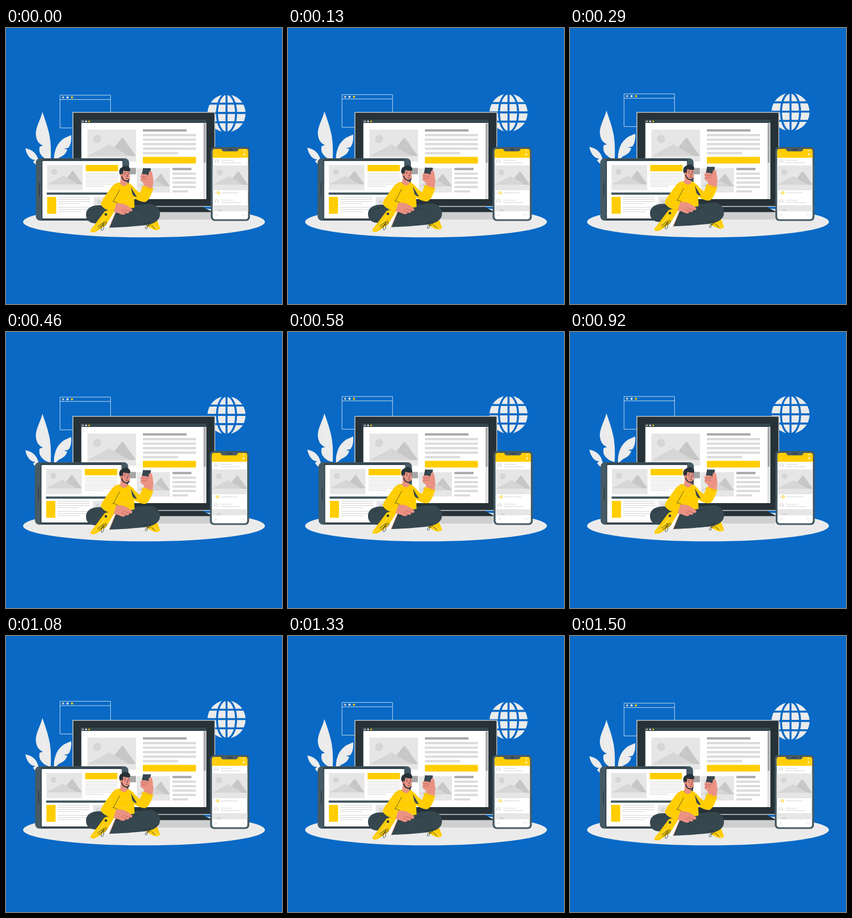
Animation, 500 px wide and 500 px high, one loop 1540 ms. Source, as an HTML page with a canvas:

```html
<!DOCTYPE html>
<html lang="en">
<head>
<meta charset="utf-8">
<title>Responsive screens</title>
<style>
html, body { margin: 0; width: 100%; height: 100%; overflow: hidden; background: #0969c5; }
canvas { display: block; width: 100vw; height: 100vh; }
</style>
</head>
<body>
<canvas id="stage"></canvas>
<script>
const canvas = document.getElementById('stage');
const ctx = canvas.getContext('2d');
const ratio = Math.max(1, window.devicePixelRatio || 1);
canvas.width = canvas.height = 500 * ratio;

const LOOP = 1540, STEPS = 37, PERIOD = 1500, LIFT = 6.2, SWAY = 0.46;
const BLUE = '#0969c5', PALE = '#ebebeb', YELLOW = '#ffcd00', INK = '#263238',
      SLATE = '#37474f', STEEL = '#455a64', SKIN = '#eb9283', LINE = '#dbdbdb', GREY = '#a6a6a6';

function box(x1, y1, x2, y2, fill, radius = 0) {
  ctx.fillStyle = fill;
  ctx.beginPath();
  ctx.roundRect(x1, y1, x2 - x1, y2 - y1, radius);
  ctx.fill();
}

function oval(x, y, rx, ry, fill) {
  ctx.fillStyle = fill;
  ctx.beginPath();
  ctx.ellipse(x, y, rx, ry, 0, 0, 2 * Math.PI);
  ctx.fill();
}

const dot = (x, y, r, fill) => oval(x, y, r, r, fill);

function shape(d, fill) {
  ctx.fillStyle = fill;
  ctx.fill(new Path2D(d));
}

function stroke(d, color, width = 0.8) {
  ctx.strokeStyle = color;
  ctx.lineWidth = width;
  ctx.lineCap = ctx.lineJoin = 'round';
  ctx.stroke(new Path2D(d));
}

function shifted(dx, dy, draw) {
  ctx.save();
  ctx.translate(dx, dy);
  draw();
  ctx.restore();
}

function clipped(path, draw) {
  ctx.save();
  ctx.clip(path);
  draw();
  ctx.restore();
}

function speckled(d, fill, speck, seed, [x, y, w, h], count, size = 0.45) {
  const path = new Path2D(d);
  ctx.fillStyle = fill;
  ctx.fill(path);
  const random = () => (seed = (seed * 16807) % 2147483647) / 2147483647;
  clipped(path, () => {
    for (let i = 0; i < count; i++) dot(x + random() * w, y + random() * h, size, speck);
  });
}

// Picture placeholder; all inner sizes follow its width.
function picture(x, y, w, h) {
  const frame = new Path2D();
  frame.rect(x, y, w, h);
  ctx.fillStyle = '#e6e6e6';
  ctx.fill(frame);
  clipped(frame, () => {
    ctx.translate(x, y);
    ctx.scale(w / 88, w / 88);
    dot(17.5, 17, 7.5, '#d6d6d6');
    shape('M36 48 L61 17 Q63.5 13 66 17 L88 48 Z', '#c7c7c7');
    shape('M0 48 L36 29 Q40 25 44 29 L76 48 Z', '#d6d6d6');
  });
}

function rows(x1, x2, y, step, count, height, lastX = x2, fill = LINE) {
  for (let i = 0; i < count; i++)
    box(x1, y + i * step, i === count - 1 ? lastX : x2, y + i * step + height, fill);
}

function threeDots(x, y, gap, r) {
  ['#c7c7c7', '#fff', YELLOW].forEach((c, i) => dot(x + i * gap, y, r, c));
}

function browserOutline() {
  ctx.strokeStyle = '#dce8f2';
  ctx.lineWidth = 0.9;
  ctx.strokeRect(98.3, 121.7, 91, 59.3);
  stroke('M98.3 129.6 H189.3', '#dce8f2', 0.9);
  threeDots(103.5, 125.7, 8, 1.9);
}

function globe() {
  dot(399.5, 154.5, 34.5, PALE);
  stroke('M399.5 119 V190 M364 137 H435 M364 153.9 H435 M364 170.7 H435', BLUE, 3.6);
  ctx.beginPath();
  ctx.ellipse(399.5, 154.5, 17.3, 35, 0, 0, 2 * Math.PI);
  ctx.stroke();
}

function plant() {
  const tall = 'M66 152 C70 164 74 174 77 187 C81 201 82 219 81 240 C73 239 67 235 63 229 C60 225 60 219 61 215 L67 213 C59 210 55 203 54 193 C54 178 62 168 66 152 Z';
  const left = 'M35 218 C43 219 51 224 54 229 C58 234 60 243 61 251 C56 250 51 246 49 242 L53 239 C45 239 38 232 35 218 Z';
  const right = 'M118 194 C119 204 117 212 113 217 L105 219 L111 220 C109 228 103 232 96 235 L87 243 C86 226 91 212 100 204 C106 198 112 197 118 194 Z';
  speckled(tall, PALE, '#fafafa', 17, [54, 152, 28, 88], 80);
  speckled(left, PALE, '#fafafa', 31, [34, 217, 27, 34], 35);
  speckled(right, PALE, '#fafafa', 53, [86, 194, 33, 45], 45);
  stroke('M66 163 C65 193 73 214 79 238 M37 221 C47 228 54 237 60 250 M115 199 C102 210 94 223 88 239', '#f7f7f7', 0.5);
}

function monitor() {
  box(276, 333, 371, 347, '#cfcfcf');
  shape('M220 323 H354 L372 332 V333.5 H220 Z', INK);
  stroke('M220 324.5 H354', SLATE, 1);
  box(120.5, 152, 379, 324, '#c7c7c7');
  box(122, 153.6, 377.6, 322.6, INK);
  box(136.5, 166, 363, 310, '#fff');
  box(136.5, 166, 363, 172, SLATE);
  threeDots(139.5, 169.2, 5.6, 1.4);
  box(357.5, 172, 362.5, 310, '#e0e0e0');
  box(358.2, 173, 361.8, 244, GREY);

  picture(147.5, 184, 88, 58);
  box(248, 183.5, 327, 187.6, GREY);
  rows(248, 344, 192, 8.15, 5, 4.2, 312);
  box(248, 233.5, 344, 245.5, YELLOW);
  box(180, 253.5, 235.5, 265, GREY);
  picture(237, 254, 60, 44);
  box(301.5, 253.5, 336, 257.6, GREY);
  rows(301.5, 344, 262, 8, 5, 4, 330);
}

function tablet() {
  box(54, 236, 223, 349, STEEL, 8);
  box(64, 237, 212, 348.5, SLATE, 4);
  box(66, 241, 211, 345, '#fff', 1);
  stroke('M60.5 281 V304', INK, 1.2);
  picture(74.5, 248, 64.5, 45.5);
  box(144.5, 248, 203, 259.5, YELLOW);
  rows(144.5, 203, 264, 3.65, 7, 1, 178, '#cfcfcf');
  box(74, 298, 205, 302, STEEL);
  box(74.5, 306, 91, 336.5, YELLOW);
  rows(95, 153, 306.5, 3.75, 4, 1, 134, '#cfcfcf');
  rows(95, 153, 324.5, 3.9, 3, 1, 136, '#cfcfcf');
  picture(159, 306, 46, 31);
}

function post(y) {
  dot(382, y, 4, '#e3e3e3');
  dot(382, y - 1, 1.4, '#fff');
  dot(382, y + 3, 2.2, '#fff');
  box(390, y - 2.6, 412, y - 1.4, LINE);
  box(390, y + 1.6, 426, y + 2.8, LINE);
}

function phone() {
  box(371, 215.5, 442, 349.5, STEEL, 7);
  box(374.5, 219, 438.5, 346.5, '#fff', 4.5);
  shape('M374.5 235 V223.5 Q374.5 219 379 219 H434 Q438.5 219 438.5 223.5 V235 Z', YELLOW);
  shape('M388 218.5 Q391 219 391 221 Q392 223.5 395 223.5 H417 Q420 223.5 421 221 Q421 219 424 218.5 Z', STEEL);
  stroke('M403 220.3 H410', INK, 1.4);
  stroke('M381 227.3 L379.5 229 L381 230.7', '#fff3c0', 0.8);
  dot(432, 228.8, 2, '#fff0b0');
  box(430, 221.5, 434, 223, '#fff0b0');
  post(242);
  picture(374.5, 249, 64, 45);
  stroke('M379 297 L381 300 M381 297 L379 300', '#d9d9d9', 0.7);
  ctx.strokeStyle = YELLOW;
  ctx.lineWidth = 1.1;
  ctx.beginPath();
  ctx.arc(384.9, 298.6, 2, 0, 2 * Math.PI);
  ctx.stroke();
  box(390.5, 298, 421, 299.2, LINE);
  post(314);
  picture(374.5, 321, 64, 11);
  stroke('M380 339.5 V337.8 L381.5 336.5 L383 337.8 V339.5 Z', '#d9d9d9', 0.7);
  stroke('M428 337 H433 V340 H428 Z', '#e3e3e3', 0.7);
}

function legsAndShoes() {
  shape('M258 356 L274 349 L279 363 C277 367 270 367 265 364 L253 358 Z', YELLOW);
  stroke('M268 358 L276 365', '#fff', 0.7);
  shape('M188 325 C173 318 147 319 145 336 C144 350 154 354 164 354 L190 338 Z', SLATE);
  shape('M196 329 L232 321 C244 321 254 318 264 319 C277 322 281 334 278 343 C274 352 263 357 244 358 C225 360 206 361 184 362 Z', SLATE);
  shape('M192 331 L199 333 L187 362.5 L181 362 Z', '#fff');
  stroke('M198.5 334 L186.5 362', SKIN, 1);
  shape('M178 333 C182 330 188 329 196 333 L181 357 L168 366 C163 370 157 371 153.5 369.5 C152 367 154 364 157 361 Z', YELLOW);
  stroke('M156 366 L164 362 L186 334', '#fff3c0', 0.7);
  dot(181, 337.8, 2.3, INK);
  stroke('M166 360 L177 352 M168 363 L179 354 M175 357 C178 349 184 350 181 355 C179 358 177 358 175 357 C170 364 173 370 176 365 C178 361 177 359 175 357', INK, 0.9);
  stroke('M250 354 L262 352 M256 358 C262 351 265 359 257 358 C252 359 251 364 254 364 C257 363 256 360 256 358 M264 358 L270 363', INK, 0.9);
  stroke('M200 338 C214 335 228 331 242 327 M154 331 C164 326 174 325 184 327', INK, 0.7);
}

function head() {
  shape('M208 267 L207 282 C211 288 218 287 220 282 L218 275 Z', SKIN);
  shape('M209 257 C213 254 223 255 224 261 L224.5 270 C224 276 221 278 216.5 277.5 C210 276 206 270 207 264 Z', SKIN);
  stroke('M209.5 269 C211 274 213 276.5 217 277 C220 277.4 222 276.5 223 274.5', INK, 1.9);
  stroke('M217 272.8 L221 272.4', INK, 0.7);
  shape('M208 268 C203 261 205 254 210 252.5 C214 248 222 249.5 224 253.5 C226 256 225 259 223.5 260 C219 259.5 215 259 212.5 258 C212 262 211 265 210 268.5 Z', INK);
  oval(208.7, 266.5, 1.7, 2.4, SKIN);
  dot(215.5, 265, 0.8, INK);
  dot(221.8, 265, 0.8, INK);
  stroke('M213.5 262.2 L216.5 262 M220.5 262.2 L223 262.5 M219.5 265.5 L220.3 269 L218.3 269.2', INK, 0.7);
}

function sweater() {
  const body = 'M206 280 C210 285 217 284 220 280 C226 282 231 287 235 292.5 C238 295 240 297 243 298.5 L248 285 L267 290 C264 301 259 312 253 315 C247 316 240 313 232 308 L233 325 C222 328 209 328 200 326 L196 333 C184 331 171 325 172 317 C176 308 183 300 190 290 C195 283 200 280 206 280 Z';
  speckled(body, YELLOW, '#fff0b4', 97, [172, 280, 95, 53], 85, 0.5);
  shape('M226 288 L237 306 C234 306 231 305 229 301 Z', SLATE);
  stroke('M206 293 L194 315 M196 333 L201 318 M206 280.5 C210 286 217 285 220 280.5 M194 314 L202 317', INK, 0.7);
  stroke('M246 288 L265 293', '#d9a900', 0.7);
}

function hands() {
  shape('M200 318 C210 316 221 321 229 329 C229 333 226 333 223 332 C224 336 220 337 217 335 C216 339 211 339 207 337 C201 334 198 334 195 332 Z', SKIN);
  stroke('M213 328 C217 330 220 331 223 332 M209 330 C212 333 215 334 217 335', '#a8574e', 0.7);
  shape('M262 259 C266 261 266 270 267 279 L265 291 L250 286 C252 281 247 280 244 276 L248 264 Z', SKIN);
  shape('M249 254 L261 254 Q263 254.2 262.5 256 L259 267 L247 266 Z', SLATE);
  stroke('M249 254 L246.8 266', INK, 1.2);
  shape('M246 265 C251 264 257 265 260 269 L257 279 C252 281 247 280 244.5 277 C243 275 244 273 245 272 C243 270 243 266 246 265 Z', SKIN);
  stroke('M246 269.5 C250 268.5 253 269 256 270 M245 273.5 C249 272.5 252 273 255 274', '#a8574e', 0.7);
  shape('M259 261 C262 258 265 259 264 264 L261 271 L257 270 Z', SKIN);
}

function person() {
  legsAndShoes();
  sweater();
  head();
  hands();
}

// Rises for half the period, then sinks, at constant speed.
const rise = t => -LIFT * (1 - Math.abs(1 - 2 * t / PERIOD));

const SHAKE = [0, -1, 2, -4, 4, -4, 4, -4, 2, -1, 0];
function shake(t) {
  const pos = Math.min(t / PERIOD, 1) * 10;
  const i = Math.min(9, Math.floor(pos));
  return SWAY * (SHAKE[i] + (SHAKE[i + 1] - SHAKE[i]) * (pos - i));
}

function render(now) {
  const step = Math.floor((now % LOOP) / LOOP * STEPS + 0.1) % STEPS;
  const t = step * PERIOD / (STEPS - 1);
  const lift = rise(t), sway = shake(t);

  ctx.setTransform(ratio, 0, 0, ratio, 0, 0);
  box(0, 0, 500, 500, BLUE);
  oval(250, 351.3, 219, 28, PALE);
  for (const part of [browserOutline, globe, plant]) shifted(0, lift, part);
  monitor();
  for (const part of [tablet, phone]) shifted(sway, 0, part);
  shifted(0, lift, person);
}

let start;
function tick(now) {
  start ??= now;
  render(now - start);
  requestAnimationFrame(tick);
}
render(0);
requestAnimationFrame(tick);
</script>
</body>
</html>
```
